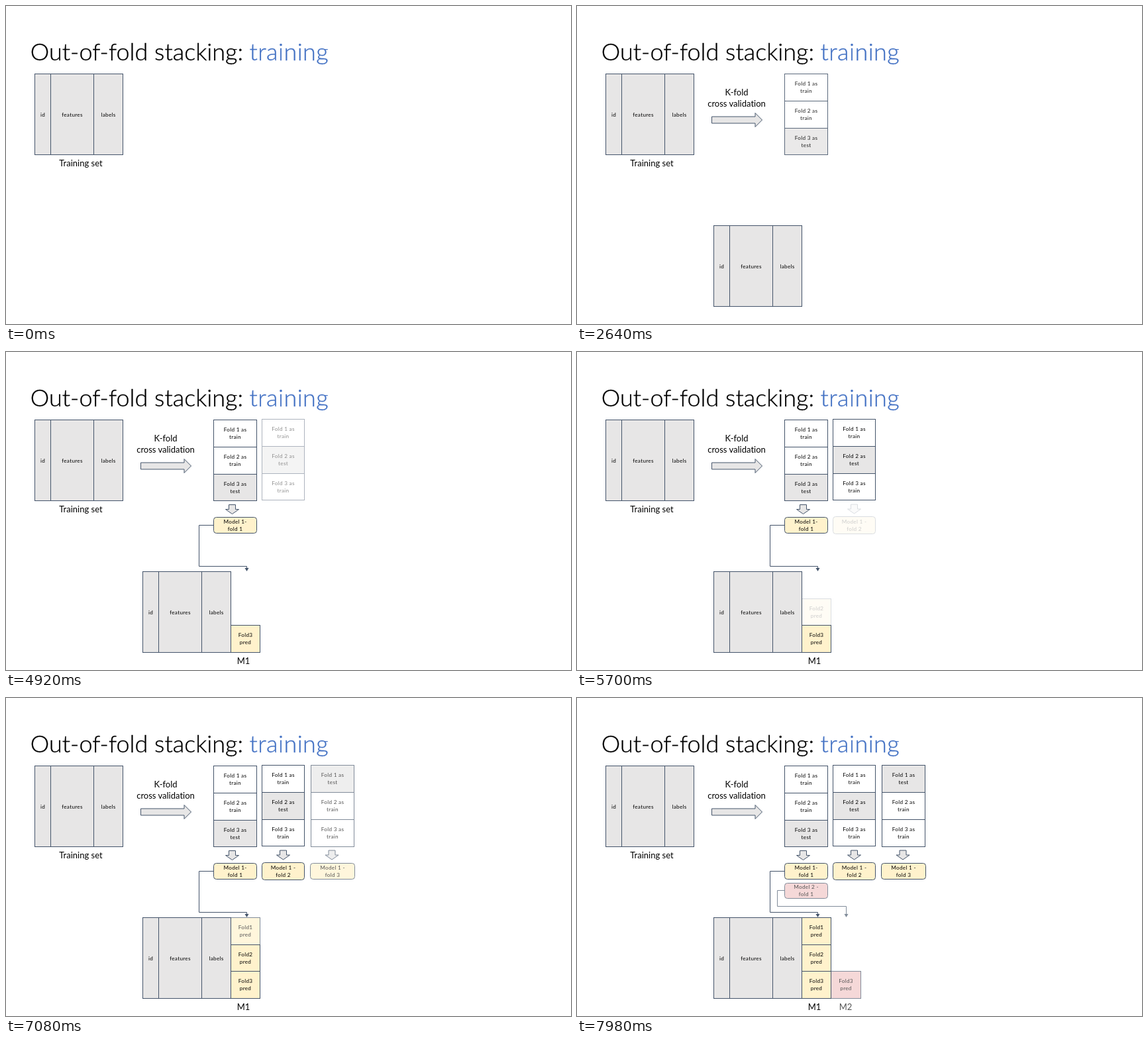
An HTML page for the animation above (8 s loop, 853 by 480 pixels).

```html
<!DOCTYPE html>
<html lang="en">
<head>
<meta charset="utf-8">
<title>Out-of-fold stacking</title>
<style>
  html, body { margin: 0; width: 100%; height: 100%; overflow: hidden; background: #fff; }
  svg { display: block; width: 853px; height: 480px; font-family: Lato, "Open Sans", sans-serif; font-variant-ligatures: none; }
  rect, path { stroke: #44546a; stroke-width: 1; }
  .title { font-size: 36px; font-weight: 300; stroke: #000; stroke-width: .35px; }
  .accent { stroke: #4472c4; letter-spacing: .45px; }
  .label { font-size: 13px; text-anchor: middle; }
  .small { font-size: 8.2px; letter-spacing: .28px; text-anchor: middle; }
</style>
</head>
<body>
<svg id="stage" viewBox="0 0 853 480"></svg>
<script>
const GREY = '#e7e6e6', WHITE = '#fff', YELLOW = '#fff2cc', PINK = '#f1c5c5', INK = '#44546a';
const LOOP = 8000, STEP = 60, FADE = 880;

const text = (cls, x, y, str, fill = '#000') =>
  `<text class="${cls}" x="${x}" y="${y}" fill="${fill}">${str}</text>`;
const label = (x, y, str) => text('label', x, y, str);

// A box given by its edges, holding one or two centred lines
function box(x1, y1, x2, y2, fill, lines, radius = 0) {
  const cx = (x1 + x2) / 2, cy = (y1 + y2) / 2;
  const first = lines.length > 1 ? cy - 2.8 : cy + 3.3;
  return `<rect x="${x1}" y="${y1}" width="${x2 - x1}" height="${y2 - y1}" rx="${radius}" fill="${fill}"/>` +
    lines.map((line, i) => text('small', cx, first + i * 11, line)).join('');
}

const table = (x, y) =>
  box(x, y, x + 24, y + 122, GREY, ['id']) +
  box(x + 24, y, x + 89, y + 122, GREY, ['features']) +
  box(x + 89, y, x + 133, y + 122, GREY, ['labels']);

const folds = (x1, x2, ys, test) => [1, 2, 3].map(n =>
  box(x1, ys[n - 1], x2, ys[n], n === test ? GREY : WHITE,
    [`Fold ${n} as`, n === test ? 'test' : 'train'])).join('');

const model = (x1, y1, x2, y2, fill, name, fold) =>
  box(x1, y1, x2, y2, fill, [name, `fold ${fold}`], 4);

const predRows = [331.5, 372.5, 412.5, 453.5];
const pred = (x1, x2, fold, fill) =>
  box(x1, predRows[fold - 1], x2, predRows[fold], fill, [`Fold${fold}`, 'pred']);

const downArrow = (x, y) =>
  `<path fill="${GREY}" d="M${x - 5} ${y}h10v7h5l-10 7l-10 -7h5z"/>`;

const connector = (y, left, bend, right) =>
  `<path fill="none" d="M313 ${y}H${left}V${bend}H${right}V327"/>` +
  `<path fill="${INK}" style="stroke:none" d="M${right - 3} 326h6l-3 5z"/>`;

const steps = [
  [20, label(241, 135, 'K-fold') + label(241, 152, 'cross validation') +
    `<path fill="${GREY}" d="M203.5 167H269V161.5L279.5 172L269 182.5V177H203.5z"/>`],
  [930, table(206.5, 331.5)],
  [1870, folds(313.5, 378.5, [102.5, 143.5, 184.5, 224.5], 3)],
  [2780, downArrow(341.5, 230.5) + model(313.5, 249.5, 378.5, 273.5, YELLOW, 'Model 1-', 1)],
  [3690, connector(261.5, 291.5, 323.5, 363.5) + pred(339.5, 383.5, 3, YELLOW) + label(358.5, 471, 'M1')],
  [4540, folds(386.5, 450.5, [101.5, 142.5, 183.5, 223.5], 2)],
  [5530, downArrow(418.5, 230) + model(386.5, 248.5, 450.5, 274.5, YELLOW, 'Model 1 -', 2) +
    pred(339.5, 383.5, 2, YELLOW)],
  [6490, folds(460.5, 525.5, [101.5, 142.5, 183.5, 224.5], 1) + downArrow(492, 230) +
    model(459.5, 249.5, 526.5, 273.5, YELLOW, 'Model 1 -', 3) + pred(339.5, 383.5, 1, YELLOW)],
  [7390, model(313.5, 279.5, 378.5, 302.5, PINK, 'Model 2 -', 1) +
    connector(290.5, 302.5, 314.5, 406.5) + pred(383.5, 428.5, 3, PINK) + label(405.5, 471, 'M2')]
];

const stage = document.getElementById('stage');
stage.innerHTML =
  text('title', 36.8, 82, 'Out-of-fold stacking:') +
  text('title accent', 367.5, 82, 'training', '#4472c4') +
  table(43.5, 102.5) + label(113, 242, 'Training set') +
  steps.map(([, content]) => `<g opacity="0">${content}</g>`).join('');
const groups = stage.querySelectorAll('g');

function draw(now) {
  const t = Math.floor(now % LOOP / STEP) * STEP;
  steps.forEach(([start], i) => {
    const opacity = Math.min(1, Math.max(0, (t - start) / FADE));
    groups[i].setAttribute('opacity', opacity);
  });
}

const origin = performance.now();
function frame() {
  draw(performance.now() - origin);
  requestAnimationFrame(frame);
}
frame();
</script>
</body>
</html>
```
